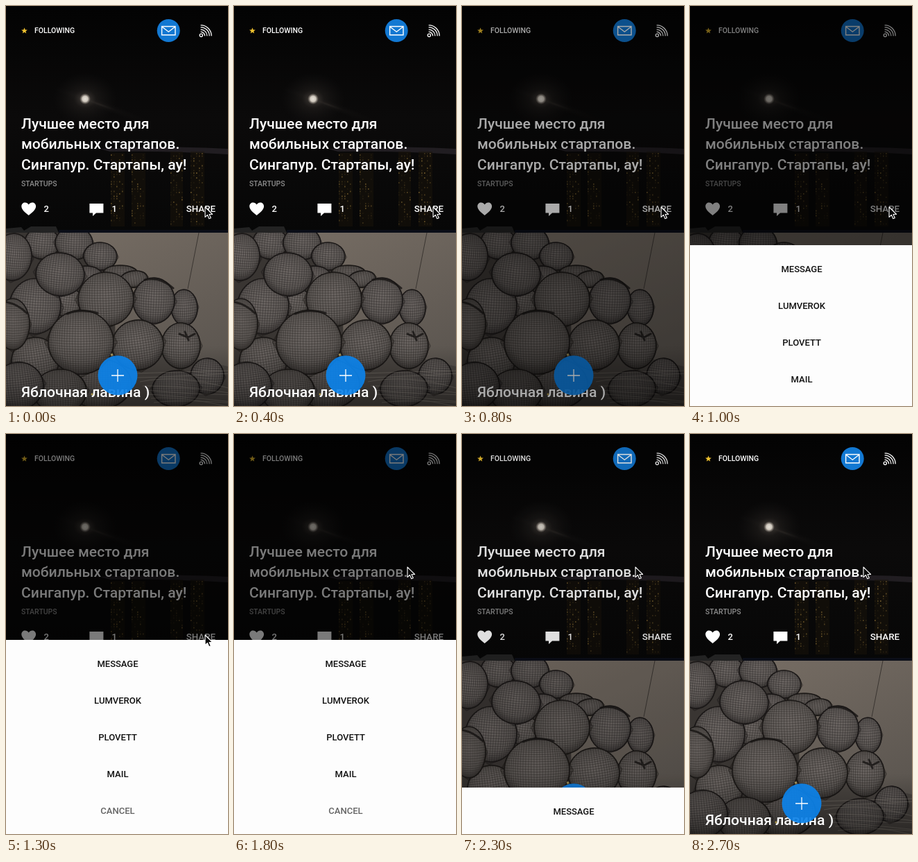
These frames come from a looping animation (320 by 577 pixels, 2.8 s). An HTML page:

```html
<!DOCTYPE html>
<html lang="ru">
<head>
<meta charset="utf-8">
<title>Share sheet</title>
<style>
  html, body { margin: 0; width: 100%; height: 100%; overflow: hidden; background: #050506; }
  svg { display: block; width: 320px; height: 577px; }
  text { font-family: Roboto, "Noto Sans", sans-serif; font-weight: 500; fill: #fff; }
  .title { font-size: 21.1px; }
  .label { font-size: 13px; }
  .small { font-size: 10.5px; }
  .item { font-size: 13px; fill: #111; text-anchor: middle; }
  .line { fill: none; stroke: #fff; }
</style>
</head>
<body>
<svg viewBox="0 0 320 577">
  <defs>
    <radialGradient id="halo">
      <stop offset="0" stop-color="#8a7f74" stop-opacity=".5"/>
      <stop offset=".35" stop-color="#453f3a" stop-opacity=".25"/>
      <stop offset="1" stop-color="#2a2725" stop-opacity="0"/>
    </radialGradient>
    <radialGradient id="moon">
      <stop offset="0" stop-color="#e6e1d8"/>
      <stop offset=".5" stop-color="#cfc8bd"/>
      <stop offset="1" stop-color="#8a8078" stop-opacity="0"/>
    </radialGradient>
    <linearGradient id="sky" x2="0" y2="1">
      <stop offset="0" stop-color="#030303"/>
      <stop offset=".5" stop-color="#0b0a0a"/>
      <stop offset="1" stop-color="#070707"/>
    </linearGradient>
    <linearGradient id="wall" x1=".4" y1="0" x2="1" y2="1">
      <stop offset="0" stop-color="#746b62"/>
      <stop offset="1" stop-color="#55504b"/>
    </linearGradient>
    <radialGradient id="ball" cx=".5" cy=".4" r=".6">
      <stop offset="0" stop-color="#6c6663"/>
      <stop offset=".7" stop-color="#5f5a57"/>
      <stop offset="1" stop-color="#403c3a"/>
    </radialGradient>
    <linearGradient id="shade" x2="0" y2="1">
      <stop offset="0" stop-opacity="0"/>
      <stop offset="1" stop-opacity=".42"/>
    </linearGradient>
    <clipPath id="lower"><rect y="327" width="320" height="250"/></clipPath>
  </defs>

  <!-- night city -->
  <rect width="320" height="327" fill="url(#sky)"/>
  <ellipse cx="114" cy="134" rx="46" ry="38" fill="url(#halo)"/>
  <ellipse cx="135" cy="142" rx="75" ry="7" transform="rotate(20 135 142)" fill="url(#halo)" opacity=".3"/>
  <circle cx="114" cy="134" r="8" fill="url(#moon)"/>
  <path d="M135 206Q230 201 320 206V214Q240 209 150 210Z" fill="#39333a" opacity=".5"/>
  <g id="towers"></g>
  <path d="M0 327V321L22 319L26 324L36 318H72L76 327Z" fill="#30302f" opacity=".7"/>
  <rect x="76" y="323" width="244" height="4" fill="#0b0e18"/>

  <!-- netted spheres -->
  <g clip-path="url(#lower)">
    <rect y="327" width="320" height="250" fill="url(#wall)"/>
    <path d="M278 327L262 408" stroke="#3a3531" stroke-width="1"/>
    <path d="M0 327H105L155 365L160 577H0Z" fill="#393532"/>
    <path d="M150 480L320 520V577H150Z" fill="#4a4541"/>
    <g id="pile"></g>
    <g id="wires" fill="none" stroke="#a39b90" stroke-width=".7" opacity=".5"></g>
    <rect y="490" width="320" height="87" fill="url(#shade)"/>
    <circle cx="152.5" cy="503" r="1.8" fill="#9b8c56"/>
    <circle cx="124" cy="560" r="1.5" fill="#b09a4a"/>
  </g>

  <!-- card header -->
  <path id="star" fill="#efc12f"/>
  <text class="small" x="41" y="39.3">FOLLOWING</text>
  <circle cx="234.2" cy="35.5" r="16.5" fill="#1278d2"/>
  <path class="line" stroke-width="1.4" d="M224.6 29.5H244V41.8H224.6ZM224.6 29.8L234.3 37.2L244 29.8"/>
  <g class="line" stroke-width="1.3">
    <circle cx="281.3" cy="42.2" r="2.1"/>
    <path id="waves"/>
  </g>

  <!-- card text -->
  <g class="title">
    <text x="22" y="176.5">Лучшее место для</text>
    <text x="22" y="206">мобильных стартапов.</text>
    <text x="22" y="235.5">Сингапур. Стартапы, ау!</text>
    <text x="22" y="563.5">Яблочная лавина )</text>
  </g>
  <text class="small" x="22" y="259.5" style="fill:#8c8c8c">STARTUPS</text>
  <path fill="#fff" d="M32.7 302C28 298 22.3 294 22.3 289C22.3 282.6 30 281.6 32.7 286.6C35.4 281.6 43.1 282.6 43.1 289C43.1 294 37.4 298 32.7 302Z"/>
  <path fill="#fff" d="M120.4 285H140.4V298.6H130L125 303V298.6H120.4Z"/>
  <text class="label" x="54.6" y="297">2</text>
  <text class="label" x="152.6" y="297">1</text>
  <text class="label" x="259.7" y="297" style="font-size:13.3px">SHARE</text>

  <circle cx="161" cy="532.8" r="28.5" fill="#0c83ea" opacity=".92"/>
  <path class="line" stroke-width="1.3" d="M152 533H170M161 524V542"/>

  <rect id="dim" width="320" height="577"/>
  <g id="sheet">
    <rect width="320" height="290" fill="#fdfdfd"/>
  </g>
  <path id="cursor" d="M0 0V14.6L3.4 11.4L5.7 16.8L8.3 15.7L6 10.5H10.6Z" fill="#0a0a0a" stroke="#fff" stroke-width="1.1" stroke-linejoin="round"/>
</svg>

<script>
const $ = id => document.getElementById(id);
const add = (parent, name, attrs) => {
  const el = document.createElementNS('http://www.w3.org/2000/svg', name);
  for (const key in attrs) el.setAttribute(key, attrs[key]);
  return parent.appendChild(el);
};

let seed = 7;
const rand = () => (seed = seed * 16807 % 2147483647) / 2147483647;

function drawTowers() {
  for (const [x, w, top] of [[151, 20, 212], [181, 20, 212], [237, 18, 210], [266, 20, 210]]) {
    add($('towers'), 'rect', { x, y: top, width: w, height: 318 - top, fill: '#1a140a', opacity: .5 });
    for (let y = top + 2; y < 314; y += 3.5) {
      for (let dx = 0; dx < w; dx += 4) {
        if (rand() > .45) continue;
        add($('towers'), 'rect', {
          x: x + dx, y, width: 1.6, height: 2, fill: '#a5843f', opacity: (.08 + rand() ** 2 * .5).toFixed(2)
        });
      }
    }
  }
}

const balls = [
  [52, 342, 25, 23], [98, 342, 27, 24], [136, 361, 24, 20], [10, 362, 27, 34],
  [118, 390, 22, 15], [165, 384, 24, 10], [184, 394, 20, 12], [257, 435, 19, 26],
  [87, 426, 22, 22], [213, 425, 30, 33], [42, 433, 37, 40], [78, 387, 35, 31],
  [144, 423, 40, 39], [290, 534, 24, 26], [245, 552, 34, 26], [252, 490, 28, 33],
  [190, 489, 37, 36], [135, 545, 46, 36], [42, 512, 34, 34], [10, 459, 24, 37],
  [108, 485, 47, 46], [78, 556, 38, 32], [18, 548, 36, 34]
];

// Each net is a set of bowed lines in both directions.
function netPath(rx, ry) {
  const n = Math.round(Math.max(rx, ry) / 2.3);
  let d = '';
  for (let i = 1 - n; i < n; i++) {
    const a = i / n * Math.PI / 2, s = Math.sin(a), c = Math.cos(a);
    const x = (rx * s).toFixed(1), y = (ry * s).toFixed(1);
    const h = (ry * c).toFixed(1), w = (rx * c).toFixed(1);
    d += `M${x} ${-h}Q${(rx * s * 1.25).toFixed(1)} 0 ${x} ${h}`;
    d += `M${-w} ${y}Q0 ${(ry * (s * 1.1 + .12)).toFixed(1)} ${w} ${y}`;
  }
  return d;
}

function drawPile() {
  for (const [x, y, rx, ry] of balls) {
    const g = add($('pile'), 'g', { transform: `translate(${x} ${y}) rotate(${(rand() * 16 - 8).toFixed(1)})` });
    add(g, 'ellipse', { rx, ry, fill: 'url(#ball)', stroke: '#1c1918', 'stroke-width': 1.7 });
    add(g, 'path', { d: netPath(rx, ry), fill: 'none', stroke: '#1d1a18', 'stroke-width': .55, opacity: .6 });
  }
  add($('pile'), 'path', {
    d: 'M88 444Q108 436 132 443M200 395Q222 390 241 407M250 473L262 478L272 473M258 470L263 482M0 427Q17 430 30 443',
    fill: 'none', stroke: '#171413', 'stroke-width': 3, 'stroke-linecap': 'round', opacity: .8
  });
  for (let i = 0; i < 8; i++) {
    const y = 530 + i * 6;
    add($('wires'), 'path', { d: `M${185 + i * 4} ${y}Q250 ${y - 12 + rand() * 20} 320 ${y + rand() * 22 - 8}` });
  }
}

function drawIcons() {
  let star = '', waves = '';
  for (let i = 0; i < 10; i++) {
    const r = i % 2 ? 2 : 4.6, a = i * Math.PI / 5;
    star += `${i ? 'L' : 'M'}${26.5 + r * Math.sin(a)} ${35.8 - r * Math.cos(a)}`;
  }
  for (const r of [6, 9.3, 12.6, 15.6]) waves += `M280.6 ${43.2 - r}A${r} ${r} 0 0 1 ${280.6 + r} 43.2`;
  $('star').setAttribute('d', star + 'Z');
  $('waves').setAttribute('d', waves);
}

function drawMenu() {
  ['MESSAGE', 'LUMVEROK', 'PLOVETT', 'MAIL', 'CANCEL'].forEach((label, i) => {
    const el = add($('sheet'), 'text', { class: 'item', x: 161, y: 38.7 + i * 53 });
    el.textContent = label;
    if (label === 'CANCEL') el.style.fill = '#666';
  });
}

const LOOP = 2800, STEP = 100;
const span = (t, a, b) => Math.min(1, Math.max(0, (t - a) / (b - a)));
const smooth = x => x * x * (3 - 2 * x);
const easeOut = (x, power) => 1 - (1 - x) ** power;

function render(t) {
  const close = 1 - smooth(span(t, 2000, 2440));
  const dim = .52 * easeOut(span(t, 600, 1100), 2) * close;
  const open = easeOut(span(t, 800, 1250), 3) * close;
  const move = smooth(span(t, 1300, 1750));
  $('dim').setAttribute('opacity', dim);
  $('sheet').setAttribute('transform', `translate(0 ${577 - 280 * open})`);
  $('cursor').setAttribute('transform', `translate(${287 - 37 * move} ${290 - 98 * move})`);
}

drawTowers();
drawPile();
drawIcons();
drawMenu();

const start = performance.now();
function tick() {
  const t = (performance.now() - start) % LOOP;
  render(Math.floor(t / STEP) * STEP);
  requestAnimationFrame(tick);
}
tick();
</script>
</body>
</html>
```
